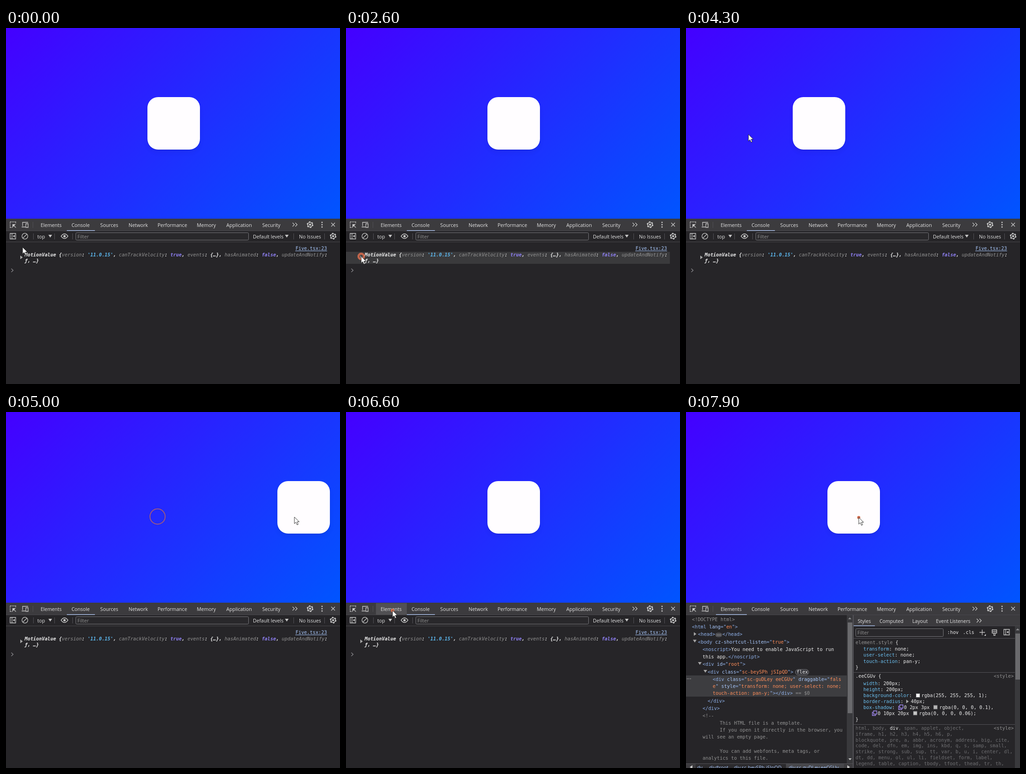
Write an HTML page that moves like this. It is 725x773 px and loops after 8000 ms.

```html
<!DOCTYPE html>
<html lang="en">
<head>
<meta charset="utf-8">
<title>Drag demo with developer tools</title>
<style>
  html, body { margin: 0; width: 100%; height: 100%; overflow: hidden; background: #262528; }
  #page { position: absolute; width: 725px; height: 414px; overflow: hidden; background: linear-gradient(135deg, #40f, #05f); }
  #box { position: absolute; left: 307px; top: 149.6px; width: 114px; height: 114.8px; border-radius: 23px; background: #fffdff;
    box-shadow: 0 1px 2px rgba(0,0,0,.1), 0 6px 11px rgba(0,0,0,.06); }
  svg { position: absolute; left: 0; top: 0; overflow: hidden; }
  text { white-space: pre; fill: #e3e3e3; font: 10.6px "Open Sans", "Noto Sans", sans-serif; }
  text.mono { font: 10.3px "DejaVu Sans Mono", "Liberation Mono", monospace; }
  text.it { font-style: italic; }
  .it .w, .it .s, .it .b { font-weight: bold; }
  .mid { text-anchor: middle; }
  .icon { fill: none; stroke: #c7c7c7; stroke-width: 1.3; }
  .w { fill: #ececec; } .k { fill: #929292; } .s { fill: #5cb8f0; } .b { fill: #8f80f5; }
  .t { fill: #8fb0e8; } .a { fill: #a8c7fa; } .o { fill: #fe8d59; } .p { fill: #6cc0f0; } .d { fill: #6f6f72; }
</style>
</head>
<body>
<div id="page"><div id="box"></div></div>
<svg id="stage" width="725" height="773"></svg>
<script>
const escape = s => s.replace(/&/g, '&amp;').replace(/</g, '&lt;');
const rect = (x, y, w, h, fill, more = '') => `<rect x="${x}" y="${y}" width="${w}" height="${h}" fill="${fill}" ${more}/>`;
const icon = (d, more = '') => `<path class="icon" d="${d}" ${more}/>`;
const solid = (d, fill = '#c7c7c7') => `<path d="${d}" fill="${fill}"/>`;
const label = (x, y, s, cls = '') => `<text x="${x}" y="${y}" class="${cls}">${escape(s)}</text>`;
// "^x" in a code line switches to colour class x
const code = (x, y, s, cls = '') => `<text x="${x}" y="${y}" class="mono ${cls}">` +
  s.split('^').slice(1).map(p => `<tspan class="${p[0]}">${escape(p.slice(1))}</tspan>`).join('') + '</text>';
const right = (x, y, fill = '#a5a5a5') => solid(`M${x} ${y - 4}l5.5 4-5.5 4z`, fill);
const down = (x, y, fill = '#a5a5a5') => solid(`M${x} ${y - 3}h8l-4 6z`, fill);
const divider = (x, y) => rect(x, y - 6, 1, 13, '#525156');
const input = (x, y, w, h) => rect(x + .5, y + .5, w, h, '#29282b', 'stroke="#78787c" rx="2"') + label(x + 4, y + 12.5, 'Filter', 'k');
const chevrons = (x, y) => icon(`M${x - 5} ${y - 4}l4 4-4 4m6-8l4 4-4 4`);
const gear = (x, y) => `<circle class="icon" cx="${x}" cy="${y}" r="5" style="stroke-width:1.6"/>` +
  `<circle cx="${x}" cy="${y}" r="2.3" fill="#c7c7c7"/>` +
  `<circle class="icon" cx="${x}" cy="${y}" r="6.2" style="stroke-width:2;stroke-dasharray:3.2 3.29"/>`;
const tabs = (list, y) => list.map(([name, x]) => label(x, y, name, 'mid')).join('');
const sidebar = (x, y) => icon(`M${x - 6} ${y - 6}h12v12h-12zM${x - 2} ${y - 6}v12`) + solid(`M${x} ${y}l4-3v6z`);

const toolbar = rect(0, 414, 725, 26, '#3c3b3e') + rect(0, 440, 725, 1, '#48474b') +
  rect(65, 415, 67, 25, '#515053', 'id="tabHover"') + rect(132, 439, 61, 1.5, '#a4b9e2', 'id="underline"') +
  icon('M9 421h13M9 421v13m12-13v4m-12 8h5', 'stroke-dasharray="2.2 1.3"') + icon('M21.5 433.5l-5-5') + solid('M14 426h7l-7 7z') +
  icon('M36 430v-8h12M34 432h8m1-7h5v8h-5z') + divider(58, 427) +
  tabs([['Elements', 98], ['Console', 162], ['Sources', 224], ['Network', 287], ['Performance', 361],
    ['Memory', 435], ['Application', 506], ['Security', 576]], 431.5) +
  chevrons(627, 427) + gear(660, 427) + [422, 427, 432].map(y => `<circle cx="686" cy="${y}" r="1.5" fill="#c7c7c7"/>`).join('') +
  icon('M706 423l8 8m0-8l-8 8');

const fields = ['^bcanTrackVelocity^w: ^btrue', '^bcurrent^w: ^b0', '>^bevents^w: {}', '^bhasAnimated^w: ^bfalse', '^bprev^w: ^b0',
  '^bprevFrameValue^w: ^b0', '^bprevUpdatedAt^w: ^b0', '>^bupdateAndNotify^w: ƒ (v, render = true)', '^bupdatedAt^w: ^b0',
  '^bversion^w: ^s"11.0.15"', '>^k[[Prototype]]^w: Object'];

const consolePanel = `<g id="console">` + sidebar(15, 452) +
  '<circle class="icon" cx="41" cy="452" r="6.3"/>' + icon('M36.5 456.5l9-9') + divider(59, 452) +
  label(68, 456.5, 'top') + down(92, 452, '#c7c7c7') + divider(105, 452) +
  icon('M119.5 452q7.5-10 15 0q-7.5 10-15 0z') + '<circle cx="127" cy="452" r="2.6" fill="#c7c7c7"/>' + divider(144, 452) +
  input(151, 444, 375, 16) + label(536, 456.5, 'Default levels') + down(605.5, 452, '#c7c7c7') + divider(624, 452) +
  label(636, 456.5, 'No Issues') + divider(691, 452) + gear(710, 452) + rect(0, 464, 725, 1, '#48474b') +
  rect(0, 486, 703, 26, '#3a3a3c', 'id="rowHover"') +
  code(628.5, 482, '^aFive.tsx:23') + rect(628, 483.5, 69, 1, '#a8c7fa') +
  code(40.5, 496, "^wMotionValue {^kversion^w: ^s'11.0.15'^w, ^kcanTrackVelocity^w: ^btrue^w, ^kevents^w: {…}, ^khasAnimated^w: ^bfalse^w, ^kupdateAndNotify^w:", 'it') +
  code(40.5, 509, '^wƒ, …}', 'it') +
  `<g id="closed">${right(31, 498)}</g><g id="open">${down(29, 498)}` +
  fields.map((s, i) => {
    const y = 522 + i * 13.7;
    return (s[0] == '>' ? right(45, y - 4) : '') + code(54, y, s);
  }).join('') + '</g>' + icon('M11.5 522.5l4 3.7-4 3.7', 'id="prompt" style="stroke:#8b8b8f"') + '</g>';

const tree = [
  [13, 454, '^k<!DOCTYPE html>'], [13, 470, '^t<html ^alang^t="^oen^t">'],
  [26, 486, '^t<head>'], [79, 486, '^t</head>'],
  [26, 502.5, '^t<body ^acz-shortcut-listen^t="^otrue^t">'],
  [36, 519, '^t<noscript>^wYou need to enable JavaScript to run'], [36, 534.5, '^wthis app.^t</noscript>'],
  [36, 551, '^t<div ^aid^t="^oroot^t">'], [47, 567.5, '^t<div ^aclass^t="^osc-beySPh jSIpQD^t">'],
  [58, 584, '^t<div ^aclass^t="^osc-guDLey eeCGUv^t" ^adraggable^t="^ofals'],
  [58, 599, '^oe^t" ^astyle^t="^otransform: none; user-select: none;'],
  [58, 614, '^otouch-action: pan-y;^t"></div>^k == $0'],
  [47, 631, '^t</div>'], [36, 647, '^t</div>'], [36, 663, '^k<!--'],
  [36, 678.5, '^k      This HTML file is a template.'], [36, 694, '^k      If you open it directly in the browser, you'],
  [36, 709, '^kwill see an empty page.'], [36, 740, '^k      You can add webfonts, meta tags, or'],
  [36, 755, '^kanalytics to this file.']];

const styles = [
  [368, 504, '^kelement.style ^w{'], [385, 518, '^ptransform^w: none;'], [385, 531, '^puser-select^w: none;'],
  [385, 544.5, '^ptouch-action^w: pan-y;'], [368, 558, '^w}'],
  [368, 577, '^w.eeCGUv {'], [668, 577, '^k<style>'], [385, 592.5, '^pwidth^w: 200px;'], [385, 605.5, '^pheight^w: 200px;'],
  [385, 619, '^pbackground-color^w:'], [511, 619, '^wrgba(255, 255, 255, 1);'],
  [385, 632, '^pborder-radius^w:'], [488, 632, '^w40px;'],
  [385, 644.5, '^pbox-shadow^w:'], [473, 644.5, '^w0 2px 3px'], [550, 644.5, '^wrgba(0, 0, 0, 0.1),'],
  [416, 657.5, '^w0 10px 20px'], [506, 657.5, '^wrgba(0, 0, 0, 0.06);'], [368, 670.5, '^w}'], [668, 690, '^k<style>'],
  ...['html, body, ^wdiv^d, span, applet, object,', 'iframe, h1, h2, h3, h4, h5, h6, p,',
    'blockquote, pre, a, abbr, acronym, address, big, cite,', 'code, del, dfn, em, img, ins, kbd, q, s, samp, small,',
    'strike, strong, sub, sup, tt, var, b, u, i, center, dl,', 'dt, dd, menu, ol, ul, li, fieldset, form, label,',
    'legend, table, caption, tbody, tfoot, thead, tr, th,'].map((s, i) => [368, 690 + i * 12.8, '^d' + s])];

const swatch = (x, y, fill) => rect(x + .5, y + .5, 8, 8, fill, 'stroke="#77777a"');
const shadowIcon = (x, y) => icon(`M${x + 3} ${y}h7v7h-7zM${x + 2} ${y + 3}h-1.5v7h7v-2`, 'style="stroke:#a58cf5"');
const elementsPanel = `<g id="elements">` +
  rect(0, 475, 346, 16, '#3b3b3e', 'id="headHover" rx="3"') + rect(0, 572, 349, 46, '#40444b', 'id="selected"') +
  tree.map(l => code(...l)).join('') + right(17, 482) + down(15, 497.5) + down(26, 546) + down(38, 563) +
  rect(64.5, 480, 13, 8, '#48484c', 'rx="4" stroke="#77777b" stroke-width=".8"') +
  [68, 71, 74].map(x => rect(x - .5, 483.5, 1.4, 1.4, '#ddd')).join('') +
  rect(237.5, 559, 29, 12, '#35353a', 'rx="6" stroke="#77777b"') + code(240, 568, '^wflex') +
  [2, 5.5, 9].map(x => rect(x, 578.5, 1.6, 1.6, '#aaa')).join('') +
  rect(349, 441, 13, 323, '#39393c') + rect(351, 457, 10, 197, '#6a6a6d') +
  solid('M352 450h7l-3.5-4z', '#89898c') + solid('M352.5 752h7l-3.5 4z') +
  rect(0, 763, 363, 10, '#2c2b2e') + rect(0, 763, 363, 1, '#535257') + rect(217, 764, 126, 9, '#47474b') +
  rect(0, 764, 21, 9, '#3c3b3e') + solid('M8 771l6-4v8z') +
  label(24, 776, 'dv', 'a') + label(50, 776, 'div#root', 'a') + label(104, 776, 'div.sc-beySPh.jSIpQD', 'a') +
  label(223, 776, 'div.sc-guDLey.eeCGUv', 'a') + rect(343, 764, 19, 9, '#3c3b3e') + solid('M350 767l6 4-6 4z') +
  rect(362, 441, 2, 332, '#535257') + rect(364, 441, 361, 24, '#3c3b3e') + rect(364, 464, 361, 1, '#48474b') +
  rect(364, 463.5, 46, 1.5, '#a4b9e2') + tabs([['Styles', 387], ['Computed', 446], ['Layout', 508], ['Event Listeners', 580]], 457.5) +
  chevrons(636, 453) + input(368, 470, 190, 17) + code(567, 482, '^w:hov') + code(601, 482, '^w.cls') +
  icon('M637 478.5h12m-6-6v12') + solid('M651 482v4h-4z') + icon('M664.5 473h10v7h-10zM664.5 476.5h10M668 480v5h3v-5') + sidebar(696, 478) +
  rect(364, 491, 350, 1, '#535257') + rect(364, 565, 350, 1, '#535257') + rect(364, 678, 350, 1, '#535257') +
  rect(714, 465, 11, 308, '#39393c') + rect(715, 481, 10, 100, '#6a6a6d') + solid('M716 474h8l-4-4z', '#89898c') +
  styles.map(l => code(...l)).join('') + swatch(499, 611, '#fff') + swatch(537, 636.5, '#b5b5b5') + swatch(493, 649.5, '#c5c5c5') +
  right(478, 628.5) + shadowIcon(461, 636) + shadowIcon(404, 649) + '</g>';

const pointer = '<circle id="ripple" fill="none" stroke="#cf6a4c"/>' +
  '<path id="cursor" d="M0 0V14.5L3.4 11.3 5.8 17 8.3 16 5.9 10.4H10.4Z" fill="#fff" stroke="#222" stroke-width=".9"/>';

stage.innerHTML = rect(0, 414, 725, 359, '#262528') + toolbar + consolePanel + elementsPanel + pointer;
const el = id => document.getElementById(id);

// time, x, y
const path = [[0, 36, 476], [350, 33, 496], [2700, 33, 496], [3200, 343, 225], [3330, 343, 225], [3700, 105, 233], [3900, 46, 233],
  [4150, 46, 233], [4550, 329, 227], [4650, 329, 227], [5000, 626, 228], [5200, 656, 230], [5350, 656, 230],
  [6450, 101, 431], [6750, 101, 431], [7200, 291, 485], [7300, 291, 485], [7800, 375, 229], [8000, 375, 229]];
const presses = [600, 2460, 3300, 4610, 6580, 7890];
const drags = [[3300, 4150], [4610, 5250]];

const slope = (i, c) => i < 0 || i + 1 >= path.length ? 0 : (path[i + 1][c] - path[i][c]) / (path[i + 1][0] - path[i][0]);
const tangent = (i, c) => {
  const a = slope(i - 1, c), b = slope(i, c);
  return a * b > 0 ? 2 * a * b / (a + b) : 0;
};
function pointerAt(t, c) {
  const i = Math.min(path.length - 2, path.findLastIndex(k => k[0] <= t));
  const d = path[i + 1][0] - path[i][0], u = (t - path[i][0]) / d, v = 1 - u;
  return path[i][c] * v * v * (1 + 2 * u) + path[i + 1][c] * u * u * (3 - 2 * u) + d * u * v * (tangent(i, c) * v - tangent(i + 1, c) * u);
}

// follows the pointer with a small lag, then springs back to the centre
function boxOffset(t) {
  const drag = drags.findLast(([start]) => t >= start);
  if (!drag) return 0;
  const [start, end] = drag, pulled = time => pointerAt(Math.max(start, time - 34), 1) - pointerAt(start, 1);
  if (t <= end) return pulled(t);
  const s = (t - end) / 1000, omega = 13, zeta = .63, damped = omega * Math.sqrt(1 - zeta * zeta);
  return pulled(end) * Math.exp(-zeta * omega * s) * (Math.cos(damped * s) + zeta * omega / damped * Math.sin(damped * s));
}

const show = (id, on) => el(id).style.display = on ? '' : 'none';
function set(id, attrs) {
  for (const name in attrs) el(id).setAttribute(name, attrs[name]);
}

function draw(t) {
  const x = pointerAt(t, 1), y = pointerAt(t, 2), expanded = t >= 700 && t < 2550, inspecting = t >= 6700;
  const over = (l, top, r, bottom) => x >= l && x < r && y >= top && y < bottom;
  el('box').style.transform = `translateX(${boxOffset(t)}px)`;
  show('console', !inspecting);
  show('elements', inspecting);
  show('open', expanded);
  show('closed', !expanded);
  show('tabHover', over(65, 414, 132, 440));
  show('rowHover', over(0, 486, 703, 512));
  show('headHover', over(0, 475, 346, 491));
  set('underline', inspecting ? { x: 65, width: 67 } : { x: 132, width: 61 });
  set('selected', { fill: t < 7900 ? '#40444b' : '#3d3d40' });
  set('prompt', { transform: `translate(0 ${expanded ? 151 : 0})` });
  set('cursor', { transform: `translate(${x} ${y})` });

  const press = presses.findLast(p => t >= p), age = (t - press) / 1000, visible = age < .48;
  show('ripple', visible);
  if (visible) {
    const radius = 3 + 37 * age, width = Math.min(radius, Math.max(1.8, 6.5 - 13 * age));
    set('ripple', { cx: pointerAt(press, 1), cy: pointerAt(press, 2), r: radius - width / 2, 'stroke-width': width, opacity: 1 - age * .6 });
  }
}

const began = performance.now();
function frame() {
  const t = (performance.now() - began) % 8000;
  draw(Math.floor(t / 100) * 100);
  requestAnimationFrame(frame);
}
frame();
</script>
</body>
</html>
```
